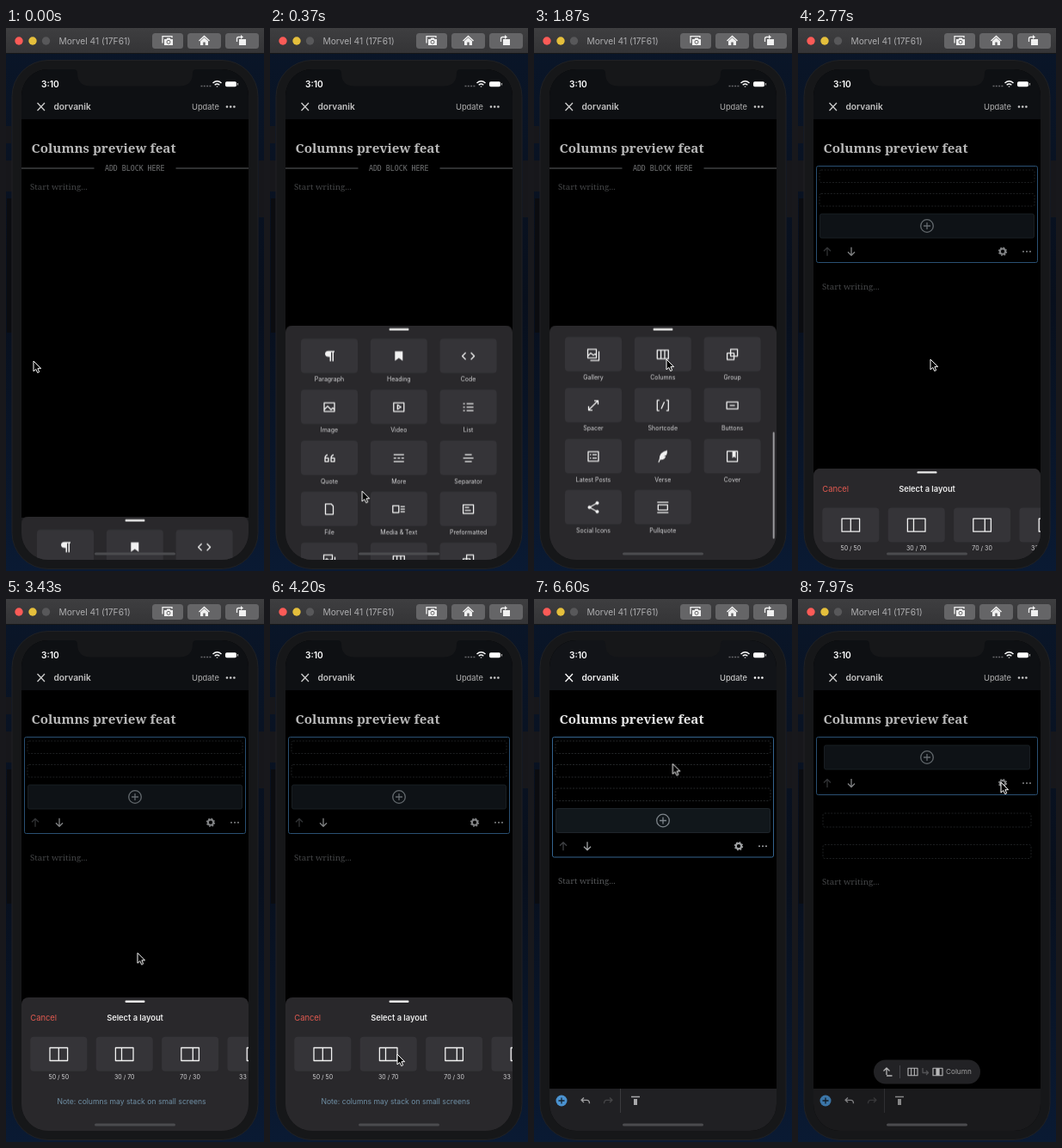
An HTML page that plays this animation: 300 px wide and 631 px high, repeating every 8 s.

```html
<!DOCTYPE html>
<html lang="en">
<head>
<meta charset="utf-8">
<title>Block editor</title>
<style>
html, body { margin: 0; width: 100%; height: 100%; overflow: hidden; background: #0a1422; }
svg { display: block; width: 100%; height: 100%; }
text { font-family: Inter, "Liberation Sans", sans-serif; }
.serif { font-family: "Noto Serif", "Liberation Serif", serif; }
.mono { font-family: "DejaVu Sans Mono", "Liberation Mono", monospace; }
.mid { text-anchor: middle; }
.line { fill: none; stroke: currentColor; stroke-width: 1.3; stroke-linejoin: round; }
.dash { fill: none; stroke: #2e3134; stroke-width: .8; stroke-dasharray: 2 1.6; }

.anim { animation: 8s linear infinite; }
#plain, #pair, #triple, #single { animation-timing-function: step-end; }
#plain { animation-name: plain; }
#pair { animation-name: pair; }
#triple { animation-name: triple; }
#single { animation-name: single; }
#dim { animation-name: dim; }
#inserter { animation-name: inserter; }
#blocks { animation-name: scroll; }
#thumb { animation-name: thumb; }
#picker { animation-name: picker; }
#layouts { animation-name: swipe; }
#cursor { animation-name: cursor; }

@keyframes plain { 0% { opacity: 1 } 29.125%, 100% { opacity: 0 } }
@keyframes pair { 0% { opacity: 0 } 29.125% { opacity: 1 } 70.5%, 100% { opacity: 0 } }
@keyframes triple { 0% { opacity: 0 } 70.5% { opacity: 1 } 87.75%, 100% { opacity: 0 } }
@keyframes single { 0% { opacity: 0 } 87.75%, 100% { opacity: 1 } }
@keyframes dim {
  0%, 28.8% { opacity: 1 } 31% { opacity: .2 } 33.5%, 70.5% { opacity: 1 }
  74%, 98.9% { opacity: 0 } 99.6%, 100% { opacity: 1 }
}
@keyframes inserter {
  0%, .375% { transform: translateY(567.5px); animation-timing-function: cubic-bezier(.2,.6,.3,1) }
  4.5%, 28.8% { transform: translateY(345.5px); animation-timing-function: ease-in }
  32%, 100% { transform: translateY(632px) }
}
@keyframes scroll {
  0%, 6.25% { transform: translateY(0); animation-timing-function: ease-in }
  9.4% { transform: translateY(-150px); animation-timing-function: ease-out }
  12.3%, 13.1% { transform: translateY(-276px); animation-timing-function: ease-out }
  18.2%, 100% { transform: translateY(-239px) }
}
@keyframes thumb {
  0%, 6.25% { y: 10px; height: 124px; opacity: 0; animation-timing-function: ease-in }
  9.4% { y: 82px; height: 124px; opacity: 1; animation-timing-function: ease-out }
  12.3%, 13.1% { y: 160px; height: 88px; opacity: 1; animation-timing-function: ease-out }
  18.2%, 100% { y: 124px; height: 124px; opacity: 1 }
}
@keyframes picker {
  0%, 31.8% { transform: translateY(632px) }
  34.625% { transform: translateY(512px); animation-timing-function: ease-out }
  38.4%, 53.1% { transform: translateY(463px); animation-timing-function: ease-out }
  57%, 70.5% { transform: translateY(460.5px); animation-timing-function: ease-in }
  74.5%, 100% { transform: translateY(632px) }
}
@keyframes swipe {
  0%, 53.1% { transform: translateX(0); animation-timing-function: ease-in-out }
  59.4%, 100% { transform: translateX(-72.5px) }
}
@keyframes cursor {
  0%, .375% { transform: translate(32px, 387px); animation-timing-function: ease-in-out }
  5%, 6.25% { transform: translate(108px, 540px); animation-timing-function: ease-in-out }
  10.4%, 13.1% { transform: translate(108px, 418px); animation-timing-function: ease-in-out }
  20.9% { transform: translate(141px, 403px); animation-timing-function: ease-out }
  23.1%, 39.1% { transform: translate(154px, 385px); animation-timing-function: ease-in-out }
  51.9%, 53.1% { transform: translate(148px, 529px); animation-timing-function: ease-in-out }
  59.4%, 60% { transform: translate(76px, 527px); animation-timing-function: ease-in-out }
  66.25%, 71.5% { transform: translate(208px, 520px); animation-timing-function: ease-in-out }
  80%, 80.4% { transform: translate(160px, 203px); animation-timing-function: ease-in-out }
  85%, 88.25% { transform: translate(163px, 176px); animation-timing-function: ease-in-out }
  97.5%, 100% { transform: translate(236px, 213px) }
}
</style>
</head>
<body>
<svg viewBox="0 0 300 631" preserveAspectRatio="none">
  <defs>
    <linearGradient id="desk" x2="0" y2="1">
      <stop offset="0" stop-color="#0a1629"/><stop offset=".5" stop-color="#080f1c"/><stop offset="1" stop-color="#0a1a33"/>
    </linearGradient>
    <linearGradient id="bar" x2="0" y2="1">
      <stop offset="0" stop-color="#3e3e40"/><stop offset="1" stop-color="#343436"/>
    </linearGradient>
    <clipPath id="screen"><rect x="18" y="48" width="264" height="570" rx="31"/></clipPath>
    <clipPath id="list"><rect x="18" y="10" width="264" height="290"/></clipPath>
  </defs>

  <rect width="300" height="631" fill="url(#desk)"/>
  <path d="M0 114h6v20H0zM0 154h7v36H0zM294 154h6v66h-6z" fill="#17171b"/>
  <path d="M1 198h6v156H1z" fill="#0b0c10"/>

  <!-- window bar -->
  <rect width="300" height="30" fill="url(#bar)"/>
  <path d="M0 29.5H300" stroke="#161618"/>
  <circle cx="15" cy="15" r="4.7" fill="#fc5b57"/>
  <circle cx="31" cy="15" r="4.7" fill="#e5bf3c"/>
  <circle cx="46.500" cy="15" r="4.7" fill="#58585a"/>
  <text x="61.500" y="18.700" font-size="10.2" fill="#adadaf">Morvel 41 (17F61)</text>
  <g fill="#656567">
    <rect x="170" y="6" width="36" height="18" rx="3.500"/>
    <rect x="211" y="6" width="39" height="18" rx="3.500"/>
    <rect x="255" y="6" width="39" height="18" rx="3.500"/>
  </g>
  <g fill="#f0f0f0">
    <path d="M182 17.500V9.700H193V11.500" fill="none" stroke="#f0f0f0" stroke-width="1.300"/>
    <path d="M184 13h2.500l1-1.500h3l1 1.500h2.500V20h-10z"/>
    <circle cx="189" cy="16.300" r="2" fill="none" stroke="#656567"/>
    <path d="M230.500 8.500l6.500 6-1 1-5.500-5-5.500 5-1-1zM226 15.200l4.500-4 4.500 4V20h-3.300v-3.500h-2.400V20H226z"/>
    <path d="M271 13h8v7h-8z"/>
    <path d="M268.500 16v-3.500q0-2 2-2h3" fill="none" stroke="#f0f0f0" stroke-width="1.300"/>
    <path d="M273 8l3 2.500-3 2.500z"/>
  </g>

  <!-- phone -->
  <rect x="7" y="37.500" width="286" height="591" rx="42" fill="#161719" stroke="#202124"/>
  <g clip-path="url(#screen)">
    <rect x="18" y="48" width="264" height="570"/>
    <rect x="18" y="48" width="264" height="58" fill="#121418"/>
    <g color="#fff">
      <path class="line" d="M36.500 87l8.500 9M45 87l-8.500 9"/>
      <text x="55.500" y="95" font-size="10.2" font-weight="600" fill="#f2f2f2">dorvanik</text>
      <text x="216" y="95" font-size="9.3" fill="#dcdcdc">Update</text>
      <path d="M257 91.500h0M261.200 91.500h0M265.400 91.500h0" stroke="#fff" stroke-width="2.700" stroke-linecap="round"/>
    </g>
    <text class="serif" x="29.500" y="145.300" font-size="15.2" font-weight="700" fill="#e6e6e6">Columns preview feat</text>

    <g id="plain" class="anim">
      <path d="M18 163H102.500M197.500 163H282" stroke="#77797b"/>
      <text class="mono mid" x="149.700" y="166" font-size="8.25" fill="#8f9193">ADD BLOCK HERE</text>
    </g>
    <g id="pair" class="anim"></g>
    <g id="triple" class="anim"></g>
    <g id="single" class="anim"></g>

    <!-- editor toolbar -->
    <rect x="18" y="569" width="264" height="49" fill="#202023"/>
    <circle cx="32" cy="583" r="6.500" fill="#4a92d0"/>
    <path d="M32 579.500v7M28.500 583h7" stroke="#16222e" stroke-width="1.300"/>
    <path class="line" color="#a0a0a2" d="M58 579.500l-3 2.800 3 2.800M55.500 582.300h6q3 0 3 4"/>
    <path class="line" color="#454547" d="M88 579.500l3 2.800-3 2.800M90.500 582.300h-6q-3 0-3 4"/>
    <path d="M100.500 569v28" stroke="#3b3b3e"/>
    <path d="M113 578.500h10" stroke="#a8a8aa" stroke-width="1.400"/>
    <path d="M116 581h4v7h-4z" fill="#a8a8aa"/>

    <rect id="dim" class="anim" x="18" y="48" width="264" height="570" fill-opacity=".2"/>

    <!-- status bar -->
    <path d="M78 48Q83 48 83 52Q83 67.500 98 67.500H202Q217 67.500 217 52Q217 48 222 48Z" fill="#161719"/>
    <text x="41" y="69" font-size="10.2" font-weight="600" fill="#fff">3:10</text>
    <path d="M226.500 67.500h12" stroke="#66666a" stroke-width="1.300" stroke-dasharray="2 1.300"/>
    <g fill="none" stroke="#fff" stroke-width="1.500">
      <path d="M240.500 64q5-4.400 10 0M242.700 66.200q2.800-2.400 5.600 0"/>
      <path d="M245.500 67.500v1"/>
    </g>
    <rect x="255" y="62.300" width="13" height="6" rx="1.700" fill="#fff"/>
    <path d="M269.500 64v2.500" stroke="#bbb"/>

    <g id="inserter" class="anim">
      <rect x="18" width="264" height="300" rx="8" fill="#29282b"/>
      <g clip-path="url(#list)"><g id="blocks" class="anim"></g></g>
      <rect id="thumb" class="anim" x="277.700" y="124" width="2" height="124" rx="1" fill="#9a9a9c"/>
      <rect x="138.500" y="3.500" width="23" height="2.400" rx="1.200" fill="#ececec"/>
    </g>

    <g id="picker" class="anim">
      <rect x="18" width="264" height="300" rx="8" fill="#29282b"/>
      <rect x="138.500" y="3.500" width="23" height="2.400" rx="1.200" fill="#ececec"/>
      <text x="28.300" y="27.300" font-size="9.4" fill="#e25a50">Cancel</text>
      <text class="mid" x="150" y="27.300" font-size="9.3" font-weight="600" fill="#ededed">Select a layout</text>
      <g id="layouts" class="anim"></g>
      <text class="mid" x="146" y="123.500" font-size="8.6" fill="#6f8fa5">Note: columns may stack on small screens</text>
    </g>
    <rect x="103" y="609.500" width="94" height="3" rx="1.500" fill="#4b4b4e"/>
  </g>

  <path id="cursor" class="anim" d="M0 0V12L2.800 9.500 4.700 13.600 6.700 12.700 4.900 8.700H8.600Z" fill="#000" stroke="#fff" stroke-width="1"/>
</svg>

<script>
const fill = (id, parts) => document.getElementById(id).innerHTML = parts.join('');
const path = d => `<path class="line" d="${d}"/>`;
const solid = d => `<path fill="currentColor" d="${d}"/>`;

// Icons are drawn around 0,0
const icons = {
  Paragraph: solid('M1 -6H6V-4.500H5V6H3.500V-4.500H2V6H.500V1Q-5 1 -5 -2.500T-1 -6Z'),
  Heading: solid('M-4.500 -5.500H4.500V5.500L0 2.200L-4.500 5.500Z'),
  Code: path('M-3 -4L-7 0L-3 4M3 -4L7 0L3 4'),
  Image: path('M-6 -5H6V5H-6ZM-6 3L-2 -1L2 3L4 1L6 3'),
  Video: path('M-6 -5H6V5H-6ZM-1.500 -2.500V2.500L2.500 0Z'),
  List: path('M-6 -4H-4M-2 -4H6M-6 0H-4M-2 0H6M-6 4H-4M-2 4H6'),
  Quote: path('M-5 0V4H-1V0H-5Q-5 -3 -2 -4M2 0V4H6V0H2Q2 -3 5 -4'),
  More: path('M-6 -4H6M-6 0H-3M-1.500 0H1.500M3 0H6M-6 4H6'),
  Separator: path('M-6 0H6M-4 -4H4M-4 4H4'),
  File: path('M-4.500 -6H2L4.500 -3.500V6H-4.500Z'),
  'Media & Text': path('M-7 -4H0V4H-7ZM2 -3H7M2 0H7M2 3H7'),
  Preformatted: path('M-6 -5H6V5H-6ZM-4 -2H1M-4 1.500H3'),
  Gallery: path('M-6.500 -6H3.500V4H-6.500ZM-6.500 2L-3 -1.500L0 1L2 -.500L3.500 1M6.500 -3.500V7H-3.500'),
  Columns: path('M-6.500 -5H6.500V5H-6.500ZM-2.200 -5V5M2.200 -5V5'),
  Group: path('M-6 -1.500H2V6H-6ZM-2 -6H6V2H-2Z'),
  Spacer: path('M-5.500 5.500L5.500 -5.500M1 -5.500H5.500V-1M-5.500 1V5.500H-1'),
  Shortcode: path('M-4 -6H-6.500V6H-4M4 -6H6.500V6H4M1.800 -4L-1.800 4'),
  Buttons: path('M-6.500 -4H6.500V4H-6.500ZM-3 0H3'),
  'Latest Posts': path('M-6 -5.500H6V5.500H-6ZM-4 -2H-2.500M-1 -2H4M-4 2H-2.500M-1 2H4'),
  Verse: solid('M5 -7Q-4 -5 -4 3L-5.500 7H-4.300L-3 4Q2 4.500 3.500 0L1 0L4.300 -1.500Q5.500 -4 5 -7Z'),
  Cover: path('M-6 -6H6V6H-6Z') + solid('M0 -6H4V2L2 .500L0 2Z'),
  'Social Icons': path('M4.500 -5L-4.500 0L4.500 5') +
    [[4.5, -5], [-4.5, 0], [4.5, 5]].map(([x, y]) => `<circle cx="${x}" cy="${y}" r="2" fill="currentColor"/>`).join(''),
  Pullquote: path('M-6.500 -6H6.500M-6.500 6H6.500M-5.500 -3H5.500V3H-5.500Z')
};

const tile = (x, y, icon, label) =>
  `<g color="#f2f2f2" transform="translate(${x} ${y})">
    <rect width="66" height="40" rx="4" fill="#353438"/>
    <g transform="translate(33 20.3)">${icon}</g>
    <text class="mid" x="33" y="49.500" font-size="7" fill="#d6d6d8">${label}</text>
  </g>`;

fill('blocks', Object.keys(icons).map((name, i) =>
  tile(36 + i % 3 * 80.8, 15.5 + Math.floor(i / 3) * 59.25, icons[name], name.replace('&', '&amp;'))));

const layout = cuts => path('M-10.300 -7.500H10.300V7.500H-10.300Z' + cuts.map(x => `M${x} -7.500V7.500`).join(''));
fill('layouts', [
  ['50 / 50', 0], ['30 / 70', -3.2], ['70 / 30', 3.2], ['33 / 33 / 33', -3.4, 3.4],
  ['25 / 50 / 25', -5.2, 5.2], ['25 / 25 / 25 / 25', -5.2, 0, 5.2]
].map(([label, ...cuts], i) => tile(28.3 + i * 76.4, 45.7, layout(cuts), label)));

const dashed = (x, y, w, h) => `<rect class="dash" x="${x}" y="${y}" width="${w}" height="${h}" rx="2"/>`;
const frame = h => `<rect x="21.500" y="160.500" width="257" height="${h}" rx="2" fill="none" stroke="#34648f"/>`;
const prompt = y => `<text class="serif" x="28" y="${y + 3.2}" font-size="9.8" fill="#545658">Start writing...</text>`;
const adder = (x, y, w) =>
  `<rect x="${x}" y="${y}" width="${w}" height="28" rx="2" fill="#11171b" stroke="#252d33" stroke-width=".8"/>
  <g color="#7d848a" transform="translate(150 ${y + 14})"><circle class="line" r="7.300"/>${path('M-4 0H4M0 -4V4')}</g>`;
const tools = y =>
  `<g transform="translate(0 ${y})" color="#a2a4a6">
    <g color="#3e4043">${path('M34 5V-4.500M30 -.500L34 -4.500L38 -.500')}</g>
    ${path('M62 -5V4.500M58 .500L62 4.500L66 .500')}
    <circle class="line" cx="238" r="3.100" style="stroke-width:2"/>
    <circle class="line" cx="238" r="4.500" stroke-dasharray="1.767" style="stroke-width:1.300"/>
    <path d="M262 0h0M266 0h0M270 0h0" stroke="currentColor" stroke-width="2" stroke-linecap="round"/>
  </g>`;

const columns = n => {
  const end = 161 + n * 27.5;
  return [frame(end - 104), ...Array.from({ length: n }, (_, i) => dashed(25, 165 + i * 27.5, 250, 14.5)),
    adder(25.5, end, 249), tools(end + 43.7), prompt(end + 84.5)];
};

fill('plain', [document.getElementById('plain').innerHTML, prompt(185)]);
fill('pair', columns(2));
fill('triple', columns(3));
fill('single', [
  frame(67), adder(30.5, 170, 239), tools(214),
  dashed(29, 249, 242, 16), dashed(29, 285.5, 242, 16), prompt(328.5),
  `<g color="#e4e4e6">
    <rect x="88" y="535.500" width="124" height="28" rx="14" fill="#2b2b2e"/>
    ${path('M103 553V545M99.500 548.500L103 545L106.500 548.500M103 554H109.500')}
    <path d="M118.500 542v15" stroke="#55555a"/>
    <g transform="translate(133.500 549.5) scale(.85)">${icons.Columns}</g>
    <g color="#68686c">${path('M145 545V550.500H151M149 548L151.500 550.500L149 553')}</g>
    <g transform="translate(162.500 549.5) scale(.85)">${path('M-6.500 -5H6.500V5H-6.500Z')}${solid('M-2.500 -5H2.500V5H-2.500Z')}</g>
    <text x="172" y="552.300" font-size="8.2" fill="#c4c4c6">Column</text>
  </g>`
]);
</script>
</body>
</html>
```
